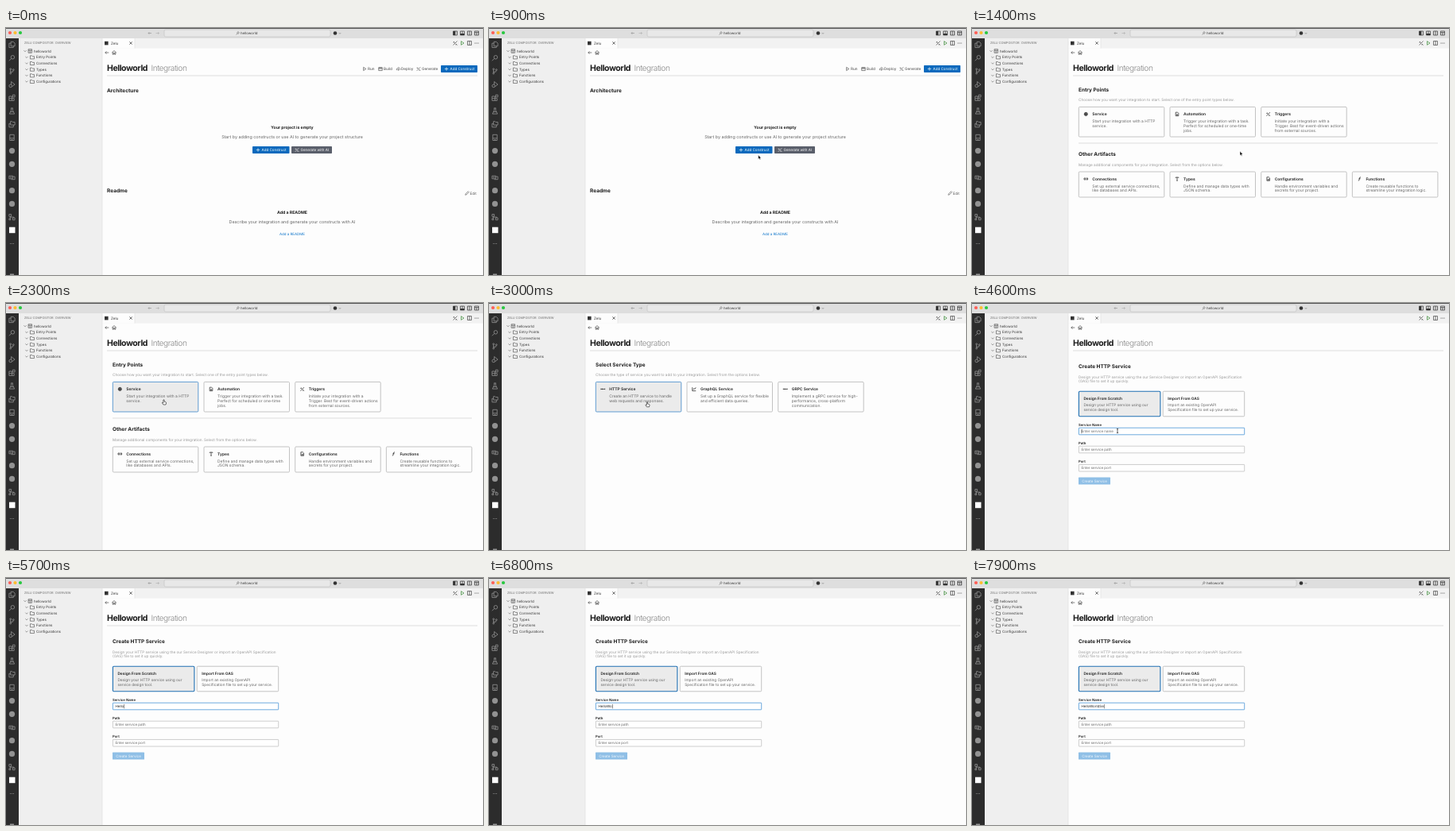
Recreate the animation shown at these times as an HTML page. Size 600 px wide and 311 px high, loop 8000 ms.

```html
<!DOCTYPE html>
<html lang="en">
<head>
<meta charset="utf-8">
<title>Create a service</title>
<style>
  html, body { margin: 0; height: 100%; overflow: hidden; background: #fdfdfd; }
  svg { display: block; width: 100vw; height: 100vh; }
  text { font-family: Inter, sans-serif; text-rendering: geometricPrecision; white-space: pre; }
</style>
</head>
<body>
<svg id="stage" viewBox="0 0 600 311"></svg>
<script>
const LOOP = 8000;
const BLUE = '#0a69bd', INK = '#1c1c1c', GREY = '#666', PALE = '#999';

// Text is placed by its left edge (or anchor) and its vertical middle.
const text = (x, y, str, size, fill = INK, weight = 400, more = '') =>
  `<text x="${x}" y="${y}" dy=".36em" font-size="${size}" fill="${fill}" font-weight="${weight}" ${more}>${str}</text>`;
const centred = (x, y, str, size, fill, weight) =>
  text(x, y, str, size, fill, weight, 'text-anchor="middle"');
const rect = (x, y, w, h, fill, stroke = 'none', radius = 0, more = '') =>
  `<rect x="${x}" y="${y}" width="${w}" height="${h}" fill="${fill}" stroke="${stroke}" rx="${radius}" ${more}/>`;
const dot = (x, y, r, fill) => `<circle cx="${x}" cy="${y}" r="${r}" fill="${fill}"/>`;
const line = (x1, y, x2, colour) =>
  `<path d="M${x1} ${y}H${x2}" stroke="${colour}" stroke-width=".7"/>`;
const icon = (x, y, name, colour = '#444', scale = 1, width = .7) =>
  `<path transform="translate(${x} ${y}) scale(${scale})" d="${ICONS[name]}" fill="none" stroke="${colour}" stroke-width="${width}"/>`;
const group = (id, content) => `<g id="${id}">${content}</g>`;

const ICONS = {
  files: 'M-1.5-4H2L4-2V2H-1.5ZM-1.5-2H-4V4H2V2',
  search: 'M3.5-1A2.5 2.5 0 1 1-1.5-1A2.5 2.5 0 1 1 3.5-1M-.8.8L-4 4',
  branch: 'M-2-2V2M-2 1Q2 2 2-1M-3-3a1 1 0 1 0 2 0a1 1 0 1 0-2 0M-3 3a1 1 0 1 0 2 0a1 1 0 1 0-2 0M1-2a1 1 0 1 0 2 0a1 1 0 1 0-2 0',
  debug: 'M-1-4L4 0L0 3M-1-4V0M-4 2a2 2 0 1 0 4 0a2 2 0 1 0-4 0',
  blocks: 'M-4-2H0V4H-4ZM-4 1H3V4H0M1-4H4V-1H1Z',
  flask: 'M-1.5-4H1.5M-1-4V-1L-3.5 4H3.5L1-1V-4M-2 1H2',
  folders: 'M-2-4H0L1-3H4V1H-2ZM-2-1H-4V4H2V1',
  phone: 'M-3-4H3V4H-3ZM-3 1H3M-1 3H1',
  chain: 'M-4-2H1V2H-4ZM1-1H4V3H-1M-3 0H0',
  tree: 'M-4-4H-1V-1H-4ZM1 1H4V4H1ZM-4 2H-2V4H-4ZM-2.5-1V2M-2.5 0H2.5V1',
  chevron: 'M-2-1L0 1L2-1',
  folder: 'M-3-2.3H-.7L.3-1.3H3V2.5H-3Z',
  project: 'M-2.5-2.5H2.5V2.5H-2.5ZM-2.5-.8H2.5M0-.8V2.5',
  left: 'M2.5 0H-2.5M-.7-1.8L-2.5 0L-.7 1.8',
  right: 'M-2.5 0H2.5M.7-1.8L2.5 0L.7 1.8',
  home: 'M-3 0L0-2.7L3 0M-2-.8V2.5H-.7V.5H.7V2.5H2V-.8',
  close: 'M-1.7-1.7L1.7 1.7M1.7-1.7L-1.7 1.7',
  wand: 'M-2.5 2.5L2.5-2.5M-2-2L-.5-.5M1 1L2.5 2.5M-2.5-1H-1M1 2.5V1',
  play: 'M-1.5-2.3L2 0L-1.5 2.3Z',
  split: 'M-2.5-2.5H2.5V2.5H-2.5ZM0-2.5V2.5',
  build: 'M-2.5-2H2.5V2.3H-2.5ZM-2.5-.5H2.5M-1-2V-.5M1-2V-.5',
  deploy: 'M-2 1.5H-2.5Q-3-.5-1-1Q0-3 1.8-1Q3.5 0 2 1.5M0 2.5V0M-1 1L0 0L1 1',
  plus: 'M-2.5 0H2.5M0-2.5V2.5',
  pencil: 'M-2.5 2.5L-2 .8L1.5-2.6L2.6-1.5L-.8 2Z',
  globe: 'M-2.3 0a2.3 2.3 0 1 0 4.6 0a2.3 2.3 0 1 0-4.6 0M-2.3 0H2.3M0-2.3V2.3M-1 -2V2M1-2V2',
  page: 'M-2-2.5H.7L2-1.2V2.5H-2ZM-1 .5H1M-1 1.5H1',
  link: 'M-.5-1.1H-2.5V1.1H-.5M.5-1.1H2.5V1.1H.5M-1.2 0H1.2',
  letter: 'M-2-1.3V-2.2H2V-1.3M0-2.2V2.4M-.9 2.4H.9',
  func: 'M1.7-2.4Q.3-2.8.1-1L-.4 1.2Q-.7 2.8-1.7 2.4M-1-.3H1.3',
  nodes: 'M-2.7 0H2.7M-2.7-.8V.8M-.6-.8V.8M2.7-.8V.8',
  graph: 'M-2.5-2.5V2.5H2.5M-1.5 1L0-1L1 0L2.4-2.3',
};

function windowFrame() {
  const lights = ['#ff5f57', '#febc2e', '#28c840'].map((c, i) => dot(5 + i * 6.5, 6, 2.1, c)).join('');
  const activity = ['files', 'search', 'branch', 'debug', 'blocks', 'flask', 'folders', 'phone', 0, 0,
    'chain', 0, 0, 'tree'].map((name, i) => {
    const y = 21 + i * 16.7;
    return name ? icon(7.5, y, name, '#929292', .9, .9) : dot(7.5, y, 3.6, '#929292');
  }).join('');
  const tree = ['Entry Points', 'Connections', 'Types', 'Functions', 'Configurations'].map((name, i) => {
    const y = 36.8 + i * 7.65;
    return icon(26, y, 'chevron', '#555', .8) + icon(33, y, 'folder', '#444', .85) + text(38, y, name, 4.45, '#333');
  }).join('');
  const panels = [565, 574, 583, 592].map((x, i) =>
    icon(x, 6.5, i == 3 ? 'project' : 'split', '#333') + (i < 3 ? rect(x - (i == 0 ? 2.5 : i == 2 ? 0 : 2.5),
      i == 1 ? 7 : 4, i == 1 ? 5 : 2.5, i == 1 ? 2 : 5, i == 2 ? 'none' : '#333') : '')).join('');
  const dots = (x, y, c) => [-2, 0, 2].map(d => dot(x + d, y, .55, c)).join('');

  return rect(0, 0, 600, 311, '#fdfdfd') + rect(0, 0, 600, 13, '#dedede') + rect(0, 0, 600, .8, '#333') + lights
    + icon(181, 6.5, 'left', '#888', .8) + icon(190.5, 6.5, 'right', '#aaa', .8)
    + rect(199, 2, 209, 9, '#e8e8e8', '#c2c2c2', 2, 'stroke-width=".6"')
    + icon(291.5, 6.5, 'search', '#555', .5, 1) + text(295, 6.5, 'helloworld', 4.4, '#333')
    + dot(414, 6.5, 2.3, '#333') + icon(420, 6.7, 'chevron', '#444', .6) + panels
    + rect(0, 13, 16, 298, '#2c2c2c') + activity
    + rect(4, 250.7, 7.5, 7.5, '#fff') + dots(7.5, 271.5, '#929292') + rect(5, 309.5, 5, 1.5, '#929292')
    + rect(16, 13, 105, 298, '#efefef')
    + text(23, 19, 'ZELU COMPOSITOR: OVERVIEW', 3.83, '#666')
    + icon(24, 29, 'chevron', '#555', .8) + icon(30.3, 29, 'project', '#444', .9) + text(35, 29, 'helloworld', 4.45, '#333') + tree
    + rect(121, 13, 479, 12.5, '#f2f2f2') + rect(121, 13, 41, 12.5, '#fdfdfd')
    + `<path d="M121 13V311M162 13V25.5" stroke="#dcdcdc" stroke-width=".6"/>`
    + rect(124, 16.8, 4.6, 4.6, '#333') + text(132, 19, 'Zelu', 4.5, '#333') + icon(157, 19, 'close', '#333')
    + icon(565, 19, 'wand', '#444') + icon(574, 19, 'play', '#388a34') + icon(583, 19, 'split', '#444') + dots(592, 19, '#444')
    + icon(127, 31, 'left', '#333', .9) + icon(136, 31, 'home', '#333', .9)
    + text(127, 50.5, 'Helloworld', 10.5, '#1a1a1a', 700, 'letter-spacing="-.42"')
    + text(182.5, 50.5, 'Integration', 10.2, '#8a8a8a', 300, 'letter-spacing="-.5"')
    + line(127, 60, 593, '#cfcfcf');
}

function button(x, y, w, label, iconName, fill = BLUE) {
  return rect(x, y, w, 9, fill, 'none', .8) + icon(x + 7, y + 4.5, iconName, '#fff', .9)
    + text(x + 11.5, y + 4.5, label, 4.55, '#fff');
}

function card(x, y, h, iconName, title, lines, id = '') {
  return rect(x, y, 107.5, h, '#fdfdfd', '#b4b4b4', 1.2, `stroke-width=".8" id="${id}"`)
    + icon(x + 9, y + 9, iconName, '#222', .9, .8) + text(x + 17, y + 9, title, 4.95, '#333', 650)
    + lines.map((s, i) => text(x + 17, y + 18 + i * 5.7, s, 4.95, GREY)).join('');
}

function projectPage() {
  const tools = [[451, 'play', 'Run', 455], [471, 'build', 'Build', 475], [493.5, 'deploy', 'Deploy', 497], [519, 'wand', 'Generate', 523]]
    .map(([ix, name, label, x]) => icon(ix, 51.5, name, '#444', .9) + text(x, 51.5, label, 4.65, '#444')).join('');
  return tools + button(547, 47, 46, 'Add Construct', 'plus')
    + text(127, 78.5, 'Architecture', 6.5, INK, 700)
    + centred(360, 125.5, 'Your project is empty', 5.15, INK, 700)
    + centred(360, 137.5, 'Start by adding constructs or use AI to generate your project structure', 5.36, GREY)
    + button(310, 149, 46.5, 'Add Construct', 'plus') + button(359, 149, 51, 'Generate with AI', 'wand', '#5a5f6b')
    + text(127, 205, 'Readme', 6.5, INK, 700)
    + icon(580, 208, 'pencil', '#555', .9) + text(583.5, 208, 'Edit', 4.6, '#555')
    + centred(360, 232, 'Add a README', 5.2, INK, 700)
    + centred(360, 244, 'Describe your integration and generate your constructs with AI', 5.37, GREY)
    + centred(360, 259, 'Add a README', 4.46, '#0b73c9');
}

function constructPage() {
  return text(134, 77.5, 'Entry Points', 6.46, INK, 700)
    + text(134, 90.5, 'Choose how you want your integration to start. Select one of the entry point types below.', 4.67, PALE)
    + card(134.3, 99.4, 37.6, 'globe', 'Service', ['Start your integration with a HTTP', 'service.'], 'serviceCard')
    + card(249, 99.4, 37.6, 'page', 'Automation', ['Trigger your integration with a task.', 'Perfect for scheduled or one-time', 'jobs.'])
    + card(363.7, 99.4, 37.6, 'wand', 'Triggers', ['Initiate your integration with a', 'Trigger. Best for event-driven actions', 'from external sources.'])
    + line(134, 145, 586, '#cfcfcf')
    + text(134, 159, 'Other Artifacts', 6.46, INK, 700)
    + text(134, 172, 'Manage additional components for your integration. Select from the options below.', 4.67, PALE)
    + card(134.3, 181, 32, 'link', 'Connections', ['Set up external service connections,', 'like databases and APIs.'])
    + card(249, 181, 32, 'letter', 'Types', ['Define and manage data types with', 'JSON schema.'])
    + card(363.7, 181, 32, 'page', 'Configurations', ['Handle environment variables and', 'secrets for your project.'])
    + card(478.4, 181, 32, 'func', 'Functions', ['Create reusable functions to', 'streamline your integration logic.']);
}

function servicePage() {
  return text(134, 77.5, 'Select Service Type', 6.46, INK, 700)
    + text(134, 90.5, 'Choose the type of service you want to add to your integration. Select from the options below.', 4.67, PALE)
    + card(134.3, 99.4, 37.6, 'nodes', 'HTTP Service', ['Create an HTTP service to handle', 'web requests and responses.'], 'httpCard')
    + card(249, 99.4, 37.6, 'graph', 'GraphQL Service', ['Set up a GraphQL service for flexible', 'and efficient data queries.'])
    + card(363.7, 99.4, 37.6, 'nodes', 'GRPC Service', ['Implement a gRPC service for high-', 'performance, cross-platform', 'communication.']);
}

function formPage() {
  const choice = (x, title, lines, chosen) =>
    rect(x, 111.2, 102.5, 31.6, chosen ? '#ebebeb' : '#fdfdfd', chosen ? '#1f6fb2' : '#b4b4b4', 1.2, `stroke-width="${chosen ? 1.1 : .8}"`)
    + text(x + 6, 120, title, 4.8, '#333', 700)
    + lines.map((s, i) => text(x + 6, 128.7 + i * 5.8, s, 4.75, GREY)).join('');
  const field = (y, label, hint, id) => text(134, y, label, 4.3, INK, 600)
    + rect(134.4, y + 4.2, 208.3, 8.6, '#fff', '#b8b8b8', .5, `stroke-width=".7" id="${id}Box"`)
    + text(137.5, y + 8.5, hint, 4.45, '#666', 400, `id="${id}"`);
  return text(134, 80, 'Create HTTP Service', 6.46, INK, 700)
    + text(134, 93, 'Design your HTTP service using the our Service Designer or import an OpenAPI Specification', 4.67, PALE)
    + text(134, 98.7, '(OAS) file to set it up quickly.', 4.67, PALE)
    + choice(134.4, 'Design From Scratch', ['Design your HTTP service using our', 'service design tool.'], true)
    + choice(240.2, 'Import From OAS', ['Import an existing OpenAPI', 'Specification file to set up your service.'])
    + field(153, 'Service Name', '', 'name')
    + field(176, 'Path', 'Enter service path', 'path')
    + field(199.2, 'Port', 'Enter service port', 'port')
    + rect(134, 219.6, 40, 9, '#8fbfe6', 'none', .6) + centred(154, 224.1, 'Create Service', 4.54, '#f4f9fd')
    + rect(0, 158.9, .5, 5.4, '#222', 'none', 0, 'id="caret"');
}

const pointers =
  group('arrow', '<path d="M0 0V5.2L1.2 4.1L2 6L2.9 5.6L2.1 3.8H3.7Z" fill="#000" stroke="#fff" stroke-width=".5"/>')
  + group('hand', '<path d="M-.6 0Q0-.6.6 0V2.2L2.6 2.8Q3.2 3 3 4L2.5 6H-.6L-2.2 3.6Q-1.8 2.8-.6 3.8Z" fill="#fff" stroke="#111" stroke-width=".6"/>')
  + group('beam', '<path d="M-1.1-2.7Q0-2.7 0-2Q0-2.7 1.1-2.7M0-2V2M-1.1 2.7Q0 2.7 0 2Q0 2.7 1.1 2.7" fill="none" stroke="#111" stroke-width=".7"/>');

const pages = { project: projectPage(), construct: constructPage(), service: servicePage(), form: formPage() };
const stage = document.getElementById('stage');
stage.innerHTML = windowFrame() + Object.entries(pages).map(([id, s]) => group(id, s)).join('') + group('pointer', pointers);

const el = id => document.getElementById(id);
const show = (id, on) => el(id).style.display = on ? '' : 'none';

// Each value holds from its start time until the next entry.
const pageTimes = [[0, 'project'], [1200, 'construct'], [2500, 'service'], [3300, 'form']];
const pointerTimes = [[0, ''], [100, 'arrow'], [2100, 'hand'], [3300, 'arrow'], [3600, 'beam'], [4900, '']];
const keyTimes = [4900, 5100, 5250, 5400, 5600, 6300, 6800, 7000, 7200, 7400, 7700, 7900];
const FOCUS_TIME = 4300;
const current = (list, t) => list.findLast(([start]) => t >= start)[1];

// Pointer moves: start, end, target x, target y.
const moves = [[100, 700, 338.7, 160], [900, 1150, 337, 155.3], [1800, 2300, 198.5, 122], [2500, 2950, 199, 124.8],
  [3300, 3700, 187, 160], [3800, 4200, 183, 161]];

function pointerAt(t) {
  let x = 470, y = 258;
  for (const [start, end, tx, ty] of moves) {
    const p = Math.min(1, Math.max(0, (t - start) / (end - start)));
    const eased = p * p * (3 - 2 * p);
    x += (tx - x) * eased;
    y += (ty - y) * eased;
  }
  return [x, y];
}

function hover(id, on) {
  el(id).setAttribute('fill', on ? '#ebebeb' : '#fdfdfd');
  el(id).setAttribute('stroke', on ? '#3a86c8' : '#b4b4b4');
}

function draw() {
  const t = performance.now() % LOOP;
  const page = current(pageTimes, t), pointer = current(pointerTimes, t);
  for (const id in pages) show(id, id === page);
  for (const id of ['arrow', 'hand', 'beam']) show(id, id === pointer);
  el('pointer').setAttribute('transform', `translate(${pointerAt(t)})`);
  hover('serviceCard', t >= 2100);
  hover('httpCard', true);

  const typed = 'HelloWorldSe'.slice(0, keyTimes.filter(k => t >= k).length);
  const focused = t >= FOCUS_TIME;
  el('name').textContent = typed || 'Enter service name';
  el('name').setAttribute('fill', typed ? '#222' : '#666');
  el('nameBox').setAttribute('stroke', focused ? '#2f86d0' : '#b8b8b8');
  show('caret', focused);
  if (focused) el('caret').setAttribute('x', 137.7 + (typed ? el('name').getComputedTextLength() : 0));
  requestAnimationFrame(draw);
}
draw();
</script>
</body>
</html>
```
